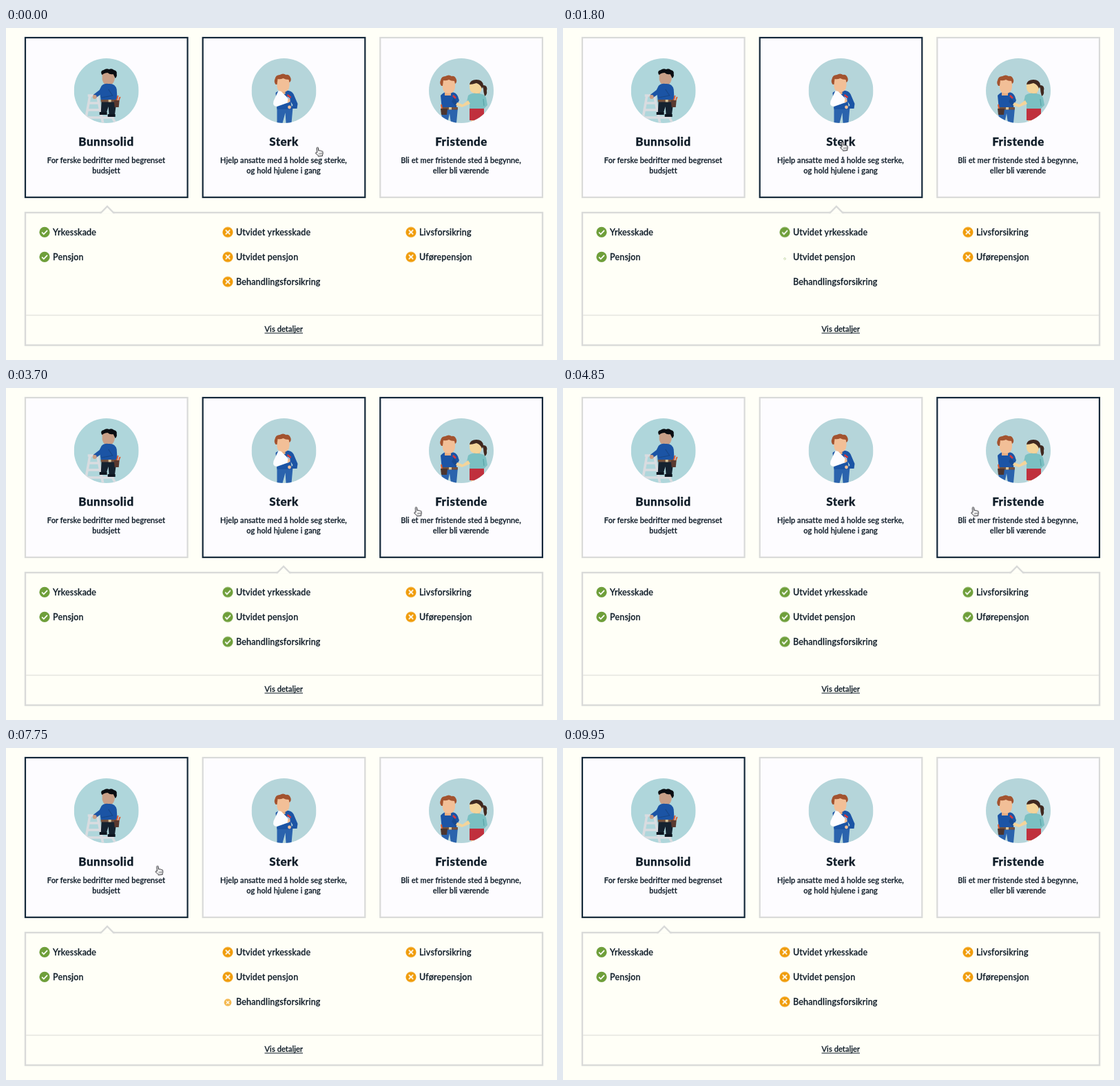
An HTML page that plays this animation: 800 by 482 pixels, repeating every 10000 ms.

```html
<!DOCTYPE html>
<html lang="no">
<head>
<meta charset="utf-8">
<title>Forsikringspakker</title>
<style>
  html, body { margin: 0; width: 100%; height: 100%; overflow: hidden; background: #fffff7; }
  svg { display: block; width: 800px; height: 482px; }
  text { font-family: Lato, "Open Sans", sans-serif; fill: #0f1c28; stroke: #0f1c28; stroke-width: .3px; }
  .mid { text-anchor: middle; }
  .title { font-size: 17px; font-weight: 800; letter-spacing: .5px; }
  .lead { font-size: 11px; font-weight: 500; letter-spacing: .1px; }
  .item { font-size: 12.5px; font-weight: 500; letter-spacing: .18px; }
  .frame { fill: #fdfcff; stroke-width: 2.2; }
  .line { stroke: #d9dad9; stroke-width: 2.4; fill: none; }

  .c1 { animation: c1 10s linear infinite; }
  .c2 { animation: c2 10s linear infinite; }
  .c3 { animation: c3 10s linear infinite; }
  .notch { animation: notch 10s ease infinite; }
  .hand { animation: hand 10s ease-in-out infinite; }

  @keyframes c1 {
    0%, 10% { stroke: #14283a; }
    12.5%, 60% { stroke: #d9dad9; }
    62%, 100% { stroke: #14283a; }
  }
  @keyframes c2 {
    0%, 38.5% { stroke: #14283a; }
    41%, 57% { stroke: #d9dad9; }
    58.5%, 59.5% { stroke: #14283a; }
    61.5%, 100% { stroke: #d9dad9; }
  }
  @keyframes c3 {
    0%, 32.5% { stroke: #d9dad9; }
    34.5%, 66.6% { stroke: #14283a; }
    69.1%, 100% { stroke: #d9dad9; }
  }
  @keyframes notch {
    0%, 14% { transform: translateX(147px); }
    19%, 42.5% { transform: translateX(403px); }
    47.5%, 70.6% { transform: translateX(659px); }
    75.6%, 100% { transform: translateX(147px); }
  }
  @keyframes hand {
    0% { transform: translate(452.3px, 174.5px); }
    8%, 27.5% { transform: translate(405.5px, 166.5px); }
    35%, 54% { transform: translate(595.5px, 174.2px); }
    62%, 86% { transform: translate(220px, 172.5px); }
    93.5%, 100% { transform: translate(-20px, 186px); }
  }
</style>
</head>
<body>
<svg viewBox="0 0 800 482">
  <defs>
    <clipPath id="disc"><circle cx="47" cy="47" r="47"/></clipPath>
    <g id="check">
      <circle r="7.6" fill="#6f9f3b"/>
      <path d="M-3.8 .2L-1.2 2.9L4 -2.6" fill="none" stroke="#fff" stroke-width="1.7"/>
    </g>
    <g id="cross">
      <circle r="7.6" fill="#f09c0a"/>
      <path d="M-3.2-3.2L3.2 3.2M3.2-3.2L-3.2 3.2" stroke="#fff" stroke-width="1.7"/>
    </g>
    <g id="redhead">
      <path d="M-5 8h9v9h-9z" fill="#e8ad82"/>
      <path d="M-9-6H10V5Q9 14 1 14T-8 6z" fill="#f2bf97"/>
      <path d="M-10 3Q-13-1-11-5Q-10-11-4-11Q1-14 5-11Q10-12 12-6Q13-2 10 0L9-4Q4-4 1-6Q-3-4-7-5L-8 3z" fill="#a3532f"/>
    </g>
  </defs>

  <rect class="frame c1" x="28" y="14" width="235.6" height="231.8"/>
  <rect class="frame c2" x="285.7" y="14" width="235.6" height="231.8"/>
  <rect class="frame c3" x="543.3" y="14" width="235.6" height="231.8"/>

  <!-- worker on a ladder -->
  <g transform="translate(98.7 44)" clip-path="url(#disc)">
    <rect width="94" height="94" fill="#afd6db"/>
    <path d="M20 54H35M23 55L16 94M34 55L42 94M22 65H36M20 75H38M18 86H58M52 78L60 94" stroke="#d9dce0" stroke-width="3.6"/>
    <path d="M40 61H62L59 84H51L50 70L47 80H39z" fill="#15222f"/>
    <path d="M37 78h11v4H37zM49 81h11v4H49z" fill="#0d1620"/>
    <path d="M45 32h10v8H45z" fill="#b98b72"/>
    <path d="M41 20h18v11q-2 8-9 8t-9-8z" fill="#c99f87"/>
    <path d="M40 23Q38 18 43 17Q47 14 51 16Q55 14 58 17Q63 18 62 23Q63 26 60 29L57 23Q52 24 49 21Q44 21 41 24z" fill="#0b0d12"/>
    <path d="M40 40Q44 36 50 37Q60 36 62 45L63 61H39L38 53L31 58L28 53L37 46z" fill="#1b54a5"/>
    <circle cx="30" cy="56" r="3" fill="#c99f87"/>
    <path d="M50 45L56 54L40 57" fill="none" stroke="#174788" stroke-width="1.2"/>
    <path d="M39 60H63v3.4H39z" fill="#72513f"/>
    <path d="M50 60h4v3.4h-4z" fill="#d4c39a"/>
    <path d="M58 61h8l-1 10h-6z" fill="#59392f"/>
    <path d="M62 61L64 54M65 61L67 56" stroke="#e2582b" stroke-width="1.8"/>
  </g>

  <!-- worker with an arm in a sling -->
  <g transform="translate(356.5 44)" clip-path="url(#disc)">
    <rect width="94" height="94" fill="#b5d5da"/>
    <path d="M37 71H60L58 94H50L49 79L45 94H37z" fill="#2b63ad"/>
    <path d="M35 50Q40 46 47 47Q58 46 61 52L67 66L66 73H56L60 68L57 63L59 74H37z" fill="#1b54a5"/>
    <circle cx="55" cy="71" r="2.4" fill="#f2bf97"/>
    <use href="#redhead" x="45" y="35"/>
    <path d="M39 47L32 62Q30 70 37 70L54 64Q56 61 53 58L43 48z" fill="#fcfcff"/>
    <path d="M53 58Q57 59 56 63L52 65z" fill="#f2bf97"/>
    <path d="M52 53l5 4" stroke="#d5383d" stroke-width="2.6"/>
    <path d="M52 56l4 3" stroke="#fff"/>
  </g>

  <!-- handshake -->
  <g transform="translate(614 44)" clip-path="url(#disc)">
    <rect width="94" height="94" fill="#b5d5da"/>
    <path d="M19 72H42L40 94H32L30 80L27 94H18z" fill="#2b63ad"/>
    <path d="M17 54Q22 48 30 49Q39 48 42 55L44 61L40 69L41 75H19z" fill="#1b54a5"/>
    <path d="M36 57L43 66L39 70L33 63z" fill="#184a90"/>
    <path d="M18 71H42v3.4H18z" fill="#72513f"/>
    <path d="M29 71h4v3.4h-4z" fill="#d4c39a"/>
    <path d="M17 73h10l-1 9h-8z" fill="#4b352f"/>
    <path d="M19 73L18 67" stroke="#e2582b" stroke-width="2"/>
    <use href="#redhead" x="28" y="37"/>
    <path d="M35 54l4 4" stroke="#d5383d" stroke-width="2.6"/>
    <path d="M61 88h5v6h-5zM71 88h5v6h-5z" fill="#f2cd9f"/>
    <path d="M77 39Q86 38 84 47Q85 53 81 55Q79 49 79 44z" fill="#40281f"/>
    <path d="M65 46h9v7h-9z" fill="#e6b988"/>
    <path d="M59 36H77V42Q77 51 69 51Q60 51 59 43z" fill="#f4d49a"/>
    <path d="M59 38Q60 31 69 31Q78 31 79 39L77 44Q75 38 69 36Q63 38 59 38z" fill="#40281f"/>
    <path d="M59 73H80V90H59z" fill="#c0303d"/>
    <path d="M57 54Q62 50 69 51Q79 50 83 57L85 68L80 73H59V64L55 63z" fill="#7bc0c2"/>
    <path d="M57 61L49 67L41 64L39 68L48 71L60 66z" fill="#f4d49a"/>
    <path d="M79 59L80 69" stroke="#5da4a9" stroke-width="1.3"/>
  </g>

  <g class="mid">
    <text class="title" x="145.5" y="171">Bunnsolid</text>
    <text class="lead" x="145.5" y="195.5">For ferske bedrifter med begrenset</text>
    <text class="lead" x="145.5" y="211">budsjett</text>
    <text class="title" x="403.5" y="171">Sterk</text>
    <text class="lead" x="403" y="195.5">Hjelp ansatte med å holde seg sterke,</text>
    <text class="lead" x="403" y="211">og hold hjulene i gang</text>
    <text class="title" x="661" y="171">Fristende</text>
    <text class="lead" x="660.5" y="195.5">Bli et mer fristende sted å begynne,</text>
    <text class="lead" x="660.5" y="211">eller bli værende</text>
    <text class="lead" x="403.3" y="441">Vis detaljer</text>
  </g>
  <path d="M375.5 443H431" stroke="#0f1c28"/>

  <rect class="line" x="28" y="268" width="751" height="192.5"/>
  <path d="M29 417H778" stroke="#e6e6e1" stroke-width="1.4"/>
  <g class="notch">
    <path d="M-9 266.5H9V269.6H-9z" fill="#fffff7"/>
    <path class="line" d="M-11 268H-9L0 259L9 268H11" style="fill:#fffff7"/>
  </g>

  <g id="list"></g>

  <g class="hand">
    <g transform="rotate(-6) scale(.88)" stroke="#17171c">
      <path d="M-1.3 7V0a1.3 1.3 0 0 1 2.6 0V4.2q2-.6 2.5.6 1.8-.5 2.2.7 1.8-.2 1.8 1.4V9.3q0 1.3-.9 2.6V13.5H-.2V12.2L-3.8 8.4q-.3-1.8 1.2-1.6z"
            fill="#fff" stroke-width="1.1" stroke-linejoin="round"/>
      <path d="M1.6 8v3M3.6 8v3M5.6 8v3" stroke-width=".7"/>
    </g>
  </g>
</svg>
<script>
  const LOOP = 10000, GROW = 250, STEP = 200;
  const SWAP = 400, FIRST = 560;         // delays after a click
  const TO_SECOND = 1000, TO_THIRD = 3850, TO_FIRST = 6660;
  const columns = [
    { x: 56, items: ["Yrkesskade", "Pensjon"] },
    { x: 322, items: ["Utvidet yrkesskade", "Utvidet pensjon", "Behandlingsforsikring"], click: TO_SECOND },
    { x: 588, items: ["Livsforsikring", "Uførepensjon"], click: TO_THIRD }
  ];
  const list = document.getElementById("list");

  function add(parent, tag, attrs, text = "") {
    const el = document.createElementNS("http://www.w3.org/2000/svg", tag);
    for (const key in attrs) el.setAttribute(key, attrs[key]);
    el.textContent = text;
    return parent.appendChild(el);
  }

  const pose = (ms, s, easing = "linear") => ({
    offset: ms / LOOP, opacity: s, easing,
    transform: `translateY(${3.5 * (1 - s)}px) scale(${s})`
  });

  // Grow in at one time, vanish at another, in either order.
  function pop(el, show, hide) {
    const grow = [pose(show, 0, "ease-out"), pose(show + GROW, 1)];
    const drop = [pose(hide, 1), pose(hide, 0)];
    const rest = show < hide ? 0 : 1;
    const middle = rest ? [...drop, ...grow] : [...grow, ...drop];
    el.animate([pose(0, rest), ...middle, pose(LOOP, rest)],
      { duration: LOOP, iterations: Infinity });
  }

  for (const { x, items, click } of columns) {
    items.forEach((label, row) => {
      const y = 296.4 + row * 36;
      const slot = add(list, "g", { transform: `translate(${x} ${y})` });
      const icon = name => add(add(slot, "g", {}), "use", { href: "#" + name }).parentNode;
      const check = icon("check");
      if (click) {
        const wait = FIRST + row * STEP;
        pop(check, click + wait, TO_FIRST + SWAP);
        pop(icon("cross"), TO_FIRST + wait, click + SWAP);
      }
      add(list, "text", { class: "item", x: x + 12, y: y + 4.3 }, label);
    });
  }
</script>
</body>
</html>
```
